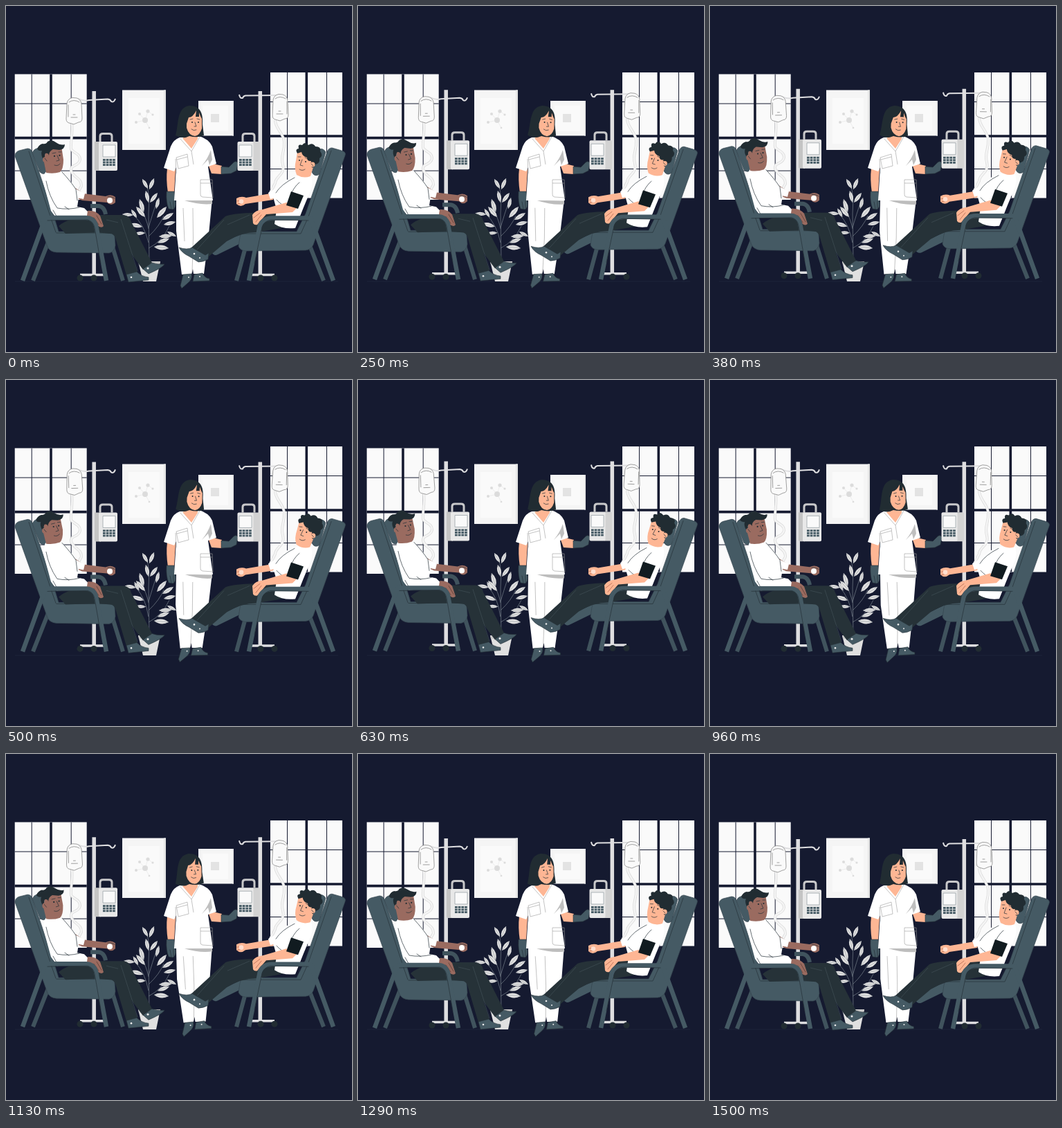
An HTML page for the animation above (1.54 s loop, 500 px wide and 500 px high).

```html
<!DOCTYPE html>
<html lang="en">
<head>
<meta charset="utf-8">
<title>Donation room</title>
<style>
html, body { margin: 0; width: 100%; height: 100%; overflow: hidden; background: #151a30; }
svg { display: block; width: 100vw; height: 100vh; }
.chair { fill: #455a64; stroke: #35464f; stroke-width: .7; }
.bar { fill: none; stroke: #455a64; stroke-width: 6.5; stroke-linejoin: round; }
.far { fill: none; stroke: #40535d; stroke-width: 6; }
.thin { fill: none; stroke: #263238; stroke-width: .7; stroke-linecap: round; }
.seam { fill: none; stroke: #9a9a9a; stroke-width: .6; }
.white { fill: #fff; }
.dark { fill: #263238; }
.hair { fill: #212c32; }
.shoe, .glove { fill: #455a64; stroke: #263238; stroke-width: .6; }
.brown { fill: #9a6b60; }
.peach { fill: #feb694; }
.metal { fill: none; stroke: #dedee0; }
.bag { fill: #fafafa; stroke: #8a8a8a; stroke-width: .8; }
.tube { fill: none; stroke: #dcdcdc; stroke-width: 4; }
.core { fill: none; stroke: #f5f5f5; stroke-width: 2.4; }
.stem { fill: none; stroke: #78828c; stroke-width: .7; }
</style>
</head>
<body>
<svg viewBox="0 0 500 500" preserveAspectRatio="none">
  <rect width="500" height="500" fill="#151a30"/>

  <defs>
    <g id="window">
      <path fill="#fafafa" d="M0 0H104V181.500H0Z"/>
      <path stroke="#151a30" d="M24.500 0V181M81.500 0V181M0 42.500H104M0 139.500H104"/>
      <path stroke="#151a30" stroke-width="3.600" d="M52.300 0V181M0 92H104"/>
    </g>
  </defs>
  <use href="#window" x="12.700" y="98.600"/>
  <use href="#window" x="382" y="96"/>

  <g id="pictures">
    <path fill="#f5f5f5" d="M168 121.500H231V208H168Z"/>
    <path fill="#e6e6e6" d="M228 121.500H231V208H228Z"/>
    <path fill="#fafafa" d="M177 133H222V199H177Z"/>
    <path fill="none" stroke="#e0e0e0" stroke-width=".5" d="M193 156L201 165L205 152M188 168L201 165L207 176M205 152L212 157"/>
    <g fill="#dcdcdc">
      <circle cx="201" cy="165" r="4"/><circle cx="193" cy="156" r="2"/>
      <circle cx="205" cy="152" r="2.600"/><circle cx="212" cy="157" r="1.600"/>
      <circle cx="188" cy="168" r="2"/><circle cx="207" cy="176" r="1.300"/>
    </g>
    <path fill="#f5f5f5" d="M278 137H329V187.500H278Z"/>
    <path fill="#e6e6e6" d="M327 137H329V187.500H327Z"/>
    <path fill="#fafafa" d="M284 144H321V181H284Z"/>
    <path fill="#e3e3e3" d="M296 156H308V168H296Z"/>
  </g>
  <path stroke="#222c40" stroke-width=".6" d="M13 398H480"/>

  <g id="plant">
    <path class="stem" d="M207 370L206 300Q208 272 203 258M206 350Q226 340 236 318M206 333Q222 318 228 303M206 320Q212 300 217 285M206 322Q203 306 193 290"/>
    <g id="leaves"></g>
    <g id="branch">
      <path class="stem" d="M206 342Q200 316 183 301"/>
    </g>
  </g>
  <path fill="#e0e0e0" d="M191 369H223L217 398H198Z"/>
  <path fill="#c9c9c9" d="M191 369H223L222 374H192Z"/>

  <g id="left">
    <path class="metal" stroke-width="5.500" d="M127.200 123V388"/>
    <path class="metal" stroke-width="2" d="M104 134Q112 138 120 136L147 134.500Q151 135 152 138Q156 140 158 134"/>
    <path class="metal" stroke-width="3.500" d="M107 388.500H142"/>
    <g class="hair"><circle cx="107" cy="393" r="4.500"/><circle cx="127" cy="393" r="4.500"/></g>
    <path class="metal" stroke-width="3" style="stroke:#c8c8ca" d="M136 196V188Q136 184.500 140 184.500H149Q153 184.500 153 188V196"/>
    <path fill="#c4c4c4" d="M128 196H137V238H130Q128 238 128 236Z"/>
    <rect x="134" y="196" width="27" height="42" rx="2" fill="#e8e8e8"/>
    <path fill="#fafafa" stroke="#9aa3a8" stroke-width=".8" d="M140 201H158V218H140Z"/>
    <g id="keysL"></g>

    <path class="tube" d="M95 169C97 185 93 195 94 207C98 213 107 213 107 222C105 233 93 228 94 238C98 249 109 248 109 260L103 271"/>
    <path class="core" d="M95 169C97 185 93 195 94 207C98 213 107 213 107 222C105 233 93 228 94 238C98 249 109 248 109 260L103 271"/>
    <g id="bagL">
      <path class="bag" d="M88 141Q89 134 96 132.500L102 133Q108 135 109 141L110 162Q110 168 105 168L98 171L91 169Q87 168 87 163Z"/>
      <path class="thin" style="stroke:#777" d="M91 139Q98 134 106 139M90 143V160M94 161H103M97 157H100"/>
    </g>

    <path class="far" d="M64 334L39 397M152 342L169 397M122 289H134Q142 290 144 301"/>
    <path class="chair" d="M13 217Q13 211 19 209L31 206Q36 206 38 211L69 303L76 326H150Q156 326 157 333L158 346Q157 355 149 357L73 356Q63 355 60 348Z"/>
    <path class="thin" d="M33 210L66 310L72 327M73 328L152 328"/>
    <path class="chair" d="M38 212Q43 202 52 208L58 238Q56 246 49 240Z"/>

    <path class="brown" d="M99 262L112 271L144 275Q152 271 158 276L158 284Q152 290 146 284L110 281L101 277Z"/>
    <circle cx="150" cy="281" r="4" class="white"/>
    <path class="thin" d="M147 275.500Q153 275 157 278"/>
    <path class="white" d="M100 264L114 271L112 279L102 277Z"/>
    <path class="dark" d="M136 302L170 302Q179 303 181 312L211 371L198 381L160 330L120 326Z"/>
    <path class="dark" d="M76 318Q90 305 125 305L150 304Q163 305 167 316L190 384L174 389L158 335Q155 327 143 327L86 329Z"/>
    <path class="seam" style="stroke:#45545c" d="M166 308Q178 345 190 383M145 309L162 313"/>
    <path class="shoe" d="M174 388L189 384Q196 391 206 392V396L177 399Z"/>
    <path class="shoe" d="M198 380L211 371Q218 374 229 373Q227 378 206 387Z"/>
    <g fill="#eee"><circle cx="181" cy="392" r="1.300"/><circle cx="205" cy="379" r="1.500"/></g>
    <path class="white" d="M57 240L80 239Q90 248 100 262L105 277L103 290L113 292L121 300L118 303L88 308L73 309Q70 302 65 296L53 252Z"/>
    <path class="thin" d="M58 253Q62 275 74 292Q90 295 106 291M81 240Q94 254 101 265L103 281M68 295L76 309M85 290L91 294"/>
    <path class="brown" d="M118 296Q129 295 136 303L141 318Q138 322 132 317L122 308L117 303Z"/>
    <path class="thin" style="stroke:#58382f" d="M127 306L134 316M131 303L138 315"/>
    <path class="bar" d="M56 309L24 397M53 312Q54 306 63 306L115 306Q127 306 130 317L145 397"/>
    <path class="thin" d="M60 310L118 309Q126 311 128 320L137 372"/>

    <g id="headL">
      <path class="brown" d="M57 208L80 202L83 222Q83 236 78 240Q69 243 58 241L55 226Z"/>
      <path class="hair" d="M45 206Q48 200 53 199Q58 200 60 196Q66 192 72 197Q79 202 85 200Q85 207 77 208L68 207Q62 210 62 216Q61 212 57 213Q55 217 57 222L53 220Q50 214 52 209Q47 210 45 206Z"/>
      <circle cx="57" cy="222" r="4" class="brown"/>
      <g class="hair"><circle cx="70" cy="217" r="1.100"/><circle cx="77.500" cy="216" r="1.100"/></g>
      <path class="thin" d="M67 213L72 212M76 211L80 211M74 216L77 223L73 224M70 230Q75 232 78 228M56 220L59 224"/>
    </g>
  </g>

  <g id="nurse">
    <g id="legs">
      <path class="white" d="M246 278H298L292 340L286 387H271L270 380L268 388H254L246 325Z"/>
      <path class="seam" d="M270 292L270.500 335L269 385M256 292L258 340"/>
      <path fill="#bdbdbd" d="M258 281H298V286Q280 288 258 281Z"/>
      <path class="shoe" d="M256 388L268 387Q270 395 262 401L254 408L252 404Z"/>
      <path class="shoe" d="M272 388L284 386Q287 393 294 394V397L270 398Z"/>
      <g fill="#eee"><circle cx="264" cy="392" r="1"/><circle cx="280" cy="391" r="1"/></g>
    </g>
    <path class="peach" d="M233 235L245 236L243 270H234Q231 250 233 235ZM291 226L312 231V243L297 242Z"/>
    <path class="glove" d="M232 268H243L245 283Q246 292 241 294L235 293Q231 284 232 268Z"/>
    <path class="thin" d="M237 283L239 293M242 282L242 292"/>
    <path class="glove" d="M311 232L322 233L329 226Q333 223 335 227L333 238L325 242L311 243Z"/>
    <path class="white" d="M251 190L279 188Q293 192 298 203L304 228L292 232L299 281H243L246 233L243 239L228 234L238 203Q242 193 251 190Z"/>
    <path fill="#bfbfbf" d="M296 208L298 222L294 230L292 222L283 231Q292 220 296 208Z"/>
    <path class="peach" d="M260 180H277L277 192L268 206L255 191L261 188Z"/>
    <path class="seam" d="M251 191L268 210L280 189M268 210L271 229M246 219L262 214L264 231L249 235ZM247 222L262 218M281 251H298L299 277L284 276Q281 276 281 272ZM281 256H298M245 221L246 242"/>
    <g id="headN">
      <path class="hair" d="M245 187C250 170 246 147 265 144C282 144 285 157 284 171L286 187Q277 191 265 188L260 190Q252 191 245 187Z"/>
      <path class="peach" d="M261 170L264 161Q270 161 275 151L274 160L279 160L279 154Q281 160 283 163L283 177Q280 187 273 188Q264 187 261 176Z"/>
      <g class="hair"><circle cx="269" cy="168" r="1"/><circle cx="278" cy="168" r="1"/></g>
      <path class="thin" d="M266 164L270 163M276 163L280 164M273 168L275 174L272 174M268 178Q271 181 275 179"/>
    </g>
  </g>

  <g id="right">
    <path class="metal" stroke-width="5.500" d="M367.300 123V388"/>
    <path class="metal" stroke-width="2" d="M392 129L346 129.500Q343 130 342 133Q338 134 337 128"/>
    <path class="metal" stroke-width="3.500" d="M353 388.500H388"/>
    <g class="hair"><circle cx="368" cy="393" r="4.500"/><circle cx="388" cy="393" r="4.500"/></g>
    <path class="metal" stroke-width="3" style="stroke:#c8c8ca" d="M342 196V188Q342 184.500 346 184.500H355Q359 184.500 359 188V196"/>
    <path fill="#d2d2d2" d="M356 196H365Q367 196 367 198V236Q367 238 365 238H356Z"/>
    <rect x="334.500" y="196" width="23" height="42" rx="2" fill="#e8e8e8"/>
    <path fill="#fafafa" stroke="#9aa3a8" stroke-width=".8" d="M337 201H355V218H337Z"/>
    <g id="keysR"></g>

    <path class="tube" d="M389 165C389 177 401 184 402 196C403 212 396 216 400 229C404 244 389 246 389 256L381 272"/>
    <path class="core" d="M389 165C389 177 401 184 402 196C403 212 396 216 400 229C404 244 389 246 389 256L381 272"/>
    <g id="bagR">
      <path class="bag" d="M386 136Q387 129 394 127.500L400 128Q406 130 407 136L408 157Q408 163 403 163L396 166L389 164Q385 163 385 158Z"/>
      <path class="thin" style="stroke:#777" d="M389 134Q396 129 404 134M406 138V156M391 156H400M394 152H397"/>
    </g>

    <path class="far" d="M434 334L459 397M347 345L333 397"/>
    <path d="M303 354L344 334" stroke="#455a64" stroke-width="12" stroke-linecap="round"/>
    <path class="chair" d="M490 216Q492 211 485 209L471 205Q466 205 464 211L433 300L420 326H345Q339 327 338 334L336 347Q338 353 346 354L433 353Q441 352 444 345Z"/>
    <path class="thin" d="M470 209L436 307L426 329L342 329"/>
    <path class="chair" d="M462 211Q457 203 450 209L442 240Q446 248 453 243Z"/>

    <path class="peach" d="M392 266L382 271L347 277Q340 274 333 278L333 286Q339 292 346 286L386 280Z"/>
    <path class="thin" style="stroke:#a85f48" d="M334 282L340 281M335 286L340 285"/>
    <circle cx="340" cy="282.500" r="3.300" fill="#ffdfcf"/>
    <path class="white" d="M379 270L389 264L392 276L382 279Z"/>
    <path class="dark" d="M392 299L352 299Q326 300 317 304L267 350L287 367L319 340Q340 327 362 327L392 322L410 318Z"/>
    <path class="seam" style="stroke:#45545c" d="M320 316L352 302M315 309L276 352"/>
    <path class="shoe" d="M250 349Q262 353 269 349L288 360L293 357L292 366Q285 370 278 370L265 362Q254 357 250 349Z"/>
    <g fill="#eee"><circle cx="272" cy="358" r="1.300"/><circle cx="280" cy="364" r="1"/></g>
    <path class="white" d="M419 246L440 244Q445 254 440 267L430 291L418 321Q400 323 388 315L391 294L386 276L390 264Q404 249 419 246Z"/>
    <path class="thin" d="M417 248Q397 258 390 270M424 255Q415 262 410 277M391 280Q400 290 407 290"/>
    <path class="peach" d="M405 284L421 291L414 298L376 301L363 316Q359 317 357 314L356 302Q360 295 371 294Z"/>
    <path class="thin" style="stroke:#a85f48" d="M358 306L367 299M361 312L369 302"/>
    <path fill="#111b20" d="M412 268L430 274L422 293L405 288Z"/>
    <path class="bar" d="M441 309L473 397M444 312Q443 306.500 434 306.500L384 306.500Q371 307 367 317L351 397"/>
    <path class="thin" d="M437 310L382 309Q373 311 370 320L359 372"/>

    <g id="headR">
      <path class="peach" d="M421 211L443 209L444 233L440 246Q430 250 420 244Q416 235 419 223Z"/>
      <path class="hair" d="M421 213Q417 207 423 206Q421 199 428 201Q432 195 437 201Q443 197 447 203Q456 203 454 210Q459 216 453 220Q454 228 447 229L443 234Q439 230 441 224Q435 225 435 219Q428 217 427 211Z"/>
      <circle cx="443" cy="229" r="3.500" class="peach"/>
      <g class="hair"><circle cx="424" cy="223" r="1"/><circle cx="433" cy="225" r="1"/></g>
      <path class="thin" d="M422 218L426 218M432 219L436 221M428 222L425 230L429 231M424 236Q428 239 432 236M441 228L444 231"/>
    </g>
  </g>
</svg>
<script>
const LOOP = 1540, STEPS = 37;
const $ = id => document.getElementById(id);

function add(parent, d, fill, line = 'none') {
  const p = document.createElementNS('http://www.w3.org/2000/svg', 'path');
  p.setAttribute('d', d);
  p.setAttribute('fill', fill);
  p.setAttribute('stroke', line);
  p.setAttribute('stroke-width', .5);
  parent.append(p);
}

// Pointed leaf from base to tip, with a midrib.
function leaf(parent, [x, y, tx, ty]) {
  const dx = tx - x, dy = ty - y, w = .32;
  const side = s => `${x + dx * .5 - s * dy * w} ${y + dy * .5 + s * dx * w}`;
  add(parent, `M${x} ${y}Q${side(1)} ${tx} ${ty}Q${side(-1)} ${x} ${y}Z`, '#e0e0e0');
  add(parent, `M${x} ${y}L${tx} ${ty}`, 'none', '#8b9299');
}

function keys(parent, x, y) {
  for (let r = 0; r < 3; r++)
    for (let c = 0; c < 4; c++)
      add(parent, `M${x + c * 4.7} ${y + r * 3.6}h3.700v2.800h-3.700z`, '#455a64');
}

keys($('keysL'), 140, 221);
keys($('keysR'), 337, 221);

[
  [205, 264, 197, 250], [207, 265, 214, 249], [206, 284, 202, 267],
  [208, 284, 219, 270], [199, 298, 193, 279], [217, 293, 221, 277],
  [201, 305, 188, 290], [218, 306, 232, 290], [226, 309, 242, 299],
  [228, 316, 245, 312], [233, 326, 246, 333], [221, 333, 240, 332],
  [219, 342, 236, 336], [214, 348, 235, 350]
].forEach(l => leaf($('leaves'), l));
[
  [184, 302, 168, 301], [189, 306, 181, 294], [197, 319, 179, 315], [201, 328, 186, 329]
].forEach(l => leaf($('branch'), l));

const move = (id, value) => $(id).setAttribute('transform', value);
const turn = (id, angle, x, y) => move(id, `rotate(${angle} ${x} ${y})`);

function draw(now) {
  const k = Math.floor((now % LOOP) / LOOP * STEPS);
  const lift = (1 + Math.cos(2 * Math.PI * (k - 17.6) / STEPS)) / 2;
  const sway = Math.sin(2 * Math.PI * k / STEPS);

  move('left', `translate(0 ${-5.8 * lift})`);
  move('right', `translate(0 ${-5.8 * lift})`);
  turn('headL', -4 * lift, 62, 240);
  turn('headR', 7 * lift, 438, 238);
  turn('bagL', -2 * lift, 99, 133);
  turn('bagR', 2 * lift, 397, 128);
  turn('branch', 7 * lift, 206, 340);
  turn('legs', 1.4 * sway, 270, 282);
  turn('headN', 1.6 * sway, 266, 192);
  requestAnimationFrame(draw);
}
draw(performance.now());
</script>
</body>
</html>
```
